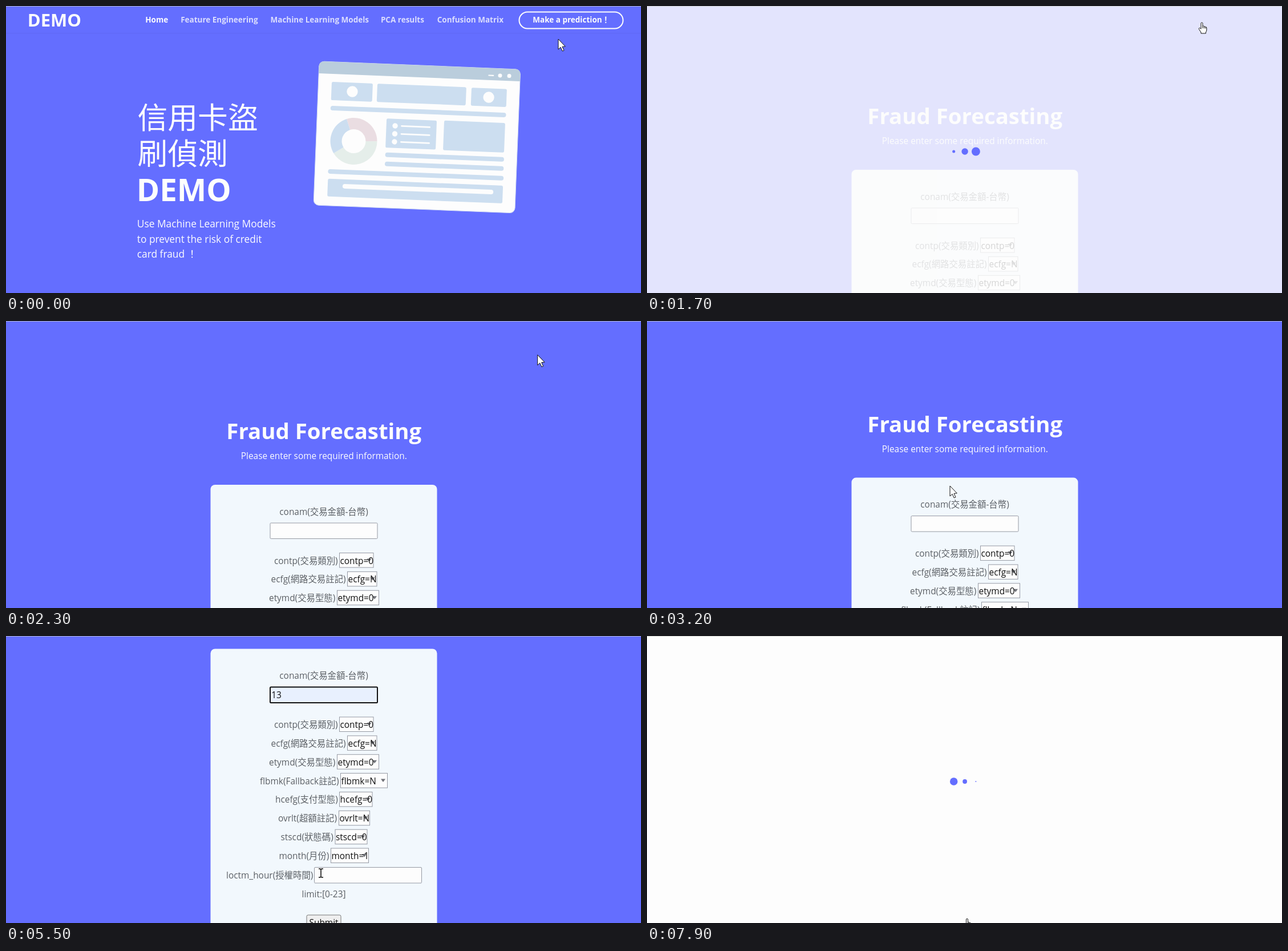
These frames come from a looping animation (1113x503 px, 8000 ms). An HTML page:

```html
<!DOCTYPE html>
<html lang="zh-Hant">
<head>
<meta charset="utf-8">
<title>Fraud detection demo</title>
<style>
html, body { margin: 0; width: 100%; height: 100%; overflow: hidden; background: #646eff; }
svg { display: block; width: 1113px; height: 503px; }
text { font-family: "Open Sans", "Noto Sans CJK TC", "Noto Sans CJK", sans-serif; white-space: pre; }
.b { font-weight: 700; }
.w { fill: #fdfdfd; }
.nav { font-size: 13.5px; font-weight: 700; fill: #fdfdfd; }
.big { font-size: 54.6px; font-weight: 700; }
.cjk { font-family: "Noto Sans CJK TC", "Noto Sans CJK", sans-serif; font-size: 52.8px; font-weight: 500; }
.lead { font-size: 17.35px; }
.form { font-size: 15.4px; }
.label { fill: #5c6065; font-weight: 400; }
.thin { font-family: "Noto Sans CJK TC", "Noto Sans CJK", sans-serif; font-weight: 300; }
.dark { fill: #111; }
.mid { text-anchor: middle; }
.box { fill: #fdfdfd; stroke: #9599a3; stroke-width: 1; }
.status { font: 12px "Liberation Serif", serif; fill: #5f6368; }
.cursor { stroke: #111; stroke-width: 1; stroke-linejoin: round; fill: #fff; }
</style>
</head>
<body>
<svg id="stage" viewBox="0 0 1113 503"></svg>
<script>
const LOOP = 8000, STEP = 100;
const stage = document.getElementById('stage');

const text = (x, y, cls, s, extra = '') => `<text x="${x}" y="${y}" class="${cls}" ${extra}>${s}</text>`;
const rect = (x, y, w, h, r, fill) => `<rect x="${x}" y="${y}" width="${w}" height="${h}" rx="${r}" fill="${fill}"/>`;
const dot = (x, y, r, fill) => `<circle cx="${x}" cy="${y}" r="${r}" fill="${fill}"/>`;

// Home page
const BLUE = '#ccdef0', PAPER = '#fdfdfd';

function slice(cx, cy, from, to, color) {
  const p = (r, a) => `${cx + r * Math.cos(a * Math.PI / 180)} ${cy + r * Math.sin(a * Math.PI / 180)}`;
  const large = to - from > 180 ? 1 : 0;
  return `<path fill="${color}" d="M${p(41, from)}A41 41 0 ${large} 1 ${p(41, to)}L${p(21, to)}A21 21 0 ${large} 0 ${p(21, from)}Z"/>`;
}

function windowArt() {
  const bars = [[23, 77, 308], [122, 155, 208.5], [122, 171, 208.5], [23, 188, 308]];
  const blocks = [[23.4, 35, 72, 32], [103.5, 35, 156, 32], [268.6, 35.5, 62, 31.5],
    [122, 95.5, 88, 51], [223, 95, 107, 52], [23.5, 205, 307, 31]];
  return `<g transform="translate(549 97) rotate(2.27)">
    <rect width="353" height="252" rx="9" fill="${PAPER}" stroke="#d3dcf3"/>
    <path fill="#bacddc" d="M0 21V9Q0 0 9 0H344Q353 0 353 9V21Z"/>
    ${rect(297, 11.6, 10, 2.2, 1, PAPER)}${dot(317.7, 12.4, 3.5, PAPER)}${dot(333.8, 12.4, 3.5, PAPER)}
    ${blocks.map(([x, y, w, h]) => rect(x, y, w, h, 2.5, BLUE)).join('')}
    ${bars.map(([x, y, w]) => rect(x, y, w, 8, 4, BLUE)).join('')}
    ${dot(60, 50.7, 9.7, PAPER)}${dot(299.3, 51.2, 9.7, PAPER)}
    ${slice(66, 137.5, -110, -2, '#eadde2')}${slice(66, 137.5, -2, 147, '#e5eeea')}${slice(66, 137.5, 147, 250, BLUE)}
    ${[107.6, 121.6, 135.6].map(y => dot(137.4, y, 4.7, PAPER) + rect(147.5, y - 1.4, 52, 2.8, 1.4, PAPER)).join('')}
    ${rect(49.5, 213, 264.5, 8, 4, PAPER)}
  </g>`;
}

const links = [[245, 'Home'], [307, 'Feature Engineering'], [464.3, 'Machine Learning Models'],
  [657.7, 'PCA results'], [756.5, 'Confusion Matrix']];

const home = `<g id="home">
  ${rect(0, 0, 1113, 503, 0, '#646eff')}${rect(0, 47, 1113, 1.5, 0, 'rgba(80,80,210,.15)')}
  ${text(37.8, 36, 'b w', 'DEMO', 'font-size="31"')}
  ${links.map(([x, s], i) => text(x - .8, 29, 'nav', s, i ? 'opacity=".78"' : '')).join('')}
  <rect id="cta" x="899.5" y="10.5" width="182" height="29" rx="14.5" fill="#fdfdfd" fill-opacity="0" stroke="#fdfdfd" stroke-width="2"/>
  ${text(923.3, 29, 'nav', 'Make a prediction！', 'id="ctaText"')}
  ${text(230.5, 215, 'cjk w', '信用卡盜')}${text(230.5, 278, 'cjk w', '刷偵測')}
  ${text(228.8, 342, 'big w', 'DEMO')}
  ${['Use Machine Learning Models', 'to prevent the risk of credit', 'card fraud！']
    .map((s, i) => text(229.8, 388 + i * 26.5, 'lead w', i == 2 ? 'card fraud ！' : s)).join('')}
  ${windowArt()}
</g>`;

// Form page, laid out unscrolled
const rows = [
  ['contp', '交易類別', 'contp=0', 470, 584.5, 59.5],
  ['ecfg', '網路交易註記', 'ecfg=N', 464.5, 598.5, 51.5],
  ['etymd', '交易型態', 'etymd=0', 461, 580.5, 73],
  ['flbmk', 'Fallback註記', 'flbmk=N', 445, 586.5, 82],
  ['hcefg', '支付型態', 'hcefg=0', 472, 584.5, 57.5],
  ['ovrlt', '超額註記', 'ovrlt=N', 477, 583.5, 54],
  ['stscd', '狀態碼', 'stscd=0', 481.5, 577, 56],
  ['month', '月份', 'month=1', 478.5, 569.5, 66]
];
const label = (name, note) =>
  `${name}(${note.replace(/[\u4e00-\u9fff]+/g, s => `<tspan class="thin">${s}</tspan>`)})`;

function selectRow([name, note, value, x, sx, w], i) {
  const y = 406.5 + i * 32.86, ax = sx + w - 7.5;
  return text(x, y + 19, 'form label', label(name, note)) +
    `<rect class="box" x="${sx}" y="${y}" width="${w}" height="25.5"/>` +
    `<path fill="#707278" d="M${ax - 4} ${y + 10}h8l-4 5.5z"/>` +
    text(sx + 1, y + 19, 'form dark', value);
}
const input = (id, x, y) =>
  `<rect id="${id}" class="box" x="${x}" y="${y}" width="188" height="27.5" rx="1.5"/>` +
  text(x + 2.3, y + 19.5, 'form dark', '', `id="${id}Text"`);

const form = `<g id="form">${rect(0, 0, 1113, 503, 0, '#646eff')}
  <g id="scroll">
    ${text(557.3, 207, 'b w mid', 'Fraud Forecasting', 'font-size="38.4"')}
    ${text(557.3, 242, 'form w mid', 'Please enter some required information.')}
    ${rect(358.5, 287, 397, 620, 8, '#f2f8fd')}
    ${text(557, 339.5, 'form label mid', label('conam', '交易金額-台幣'))}
    ${input('amount', 463, 354)}
    ${rows.map(selectRow).join('')}
    ${text(386, 689.5, 'form label', label('loctm_hour', '授權時間'))}
    ${input('hour', 540.5, 670)}
    ${text(557, 722, 'form label mid', 'limit:[0-23]')}
    <rect id="submit" x="527" y="753.5" width="60" height="28" rx="2.5" fill="#efefef" stroke="#767676"/>
    ${text(557, 772.5, 'form dark mid', 'Submit')}
  </g></g>`;

const dots = [537.7, 557.1, 576.4];
const loader = `<g id="loader">${rect(0, 0, 1113, 503, 0, PAPER)}
  ${dots.map((x, i) => `<circle id="dot${i}" cx="${x}" cy="255" fill="#646eff"/>`).join('')}</g>`;

const status = `<g id="status"><path fill="#dee1e6" d="M0 489H172Q176 489 176 493V503H0Z"/>
  ${text(4, 504, 'status', '127.0.0.1:5000/predict_page.html')}</g>`;

const cursors = `
  <path id="arrow" class="cursor" d="M0 0V18L4.2 14.3 7.2 21 10 19.8 7 13.3 12.3 12.9Z"/>
  <path id="hand" class="cursor" d="M-1.5 11V1.4Q-1.5 0 0 0T1.5 1.4V6.3Q3.2 5.2 4.1 7Q5.8 6.1 6.6 7.9Q8.4 7.5 8.4 9.5V13Q8.4 15 7 16.8V19H-1.5V17L-5 11.7Q-5.8 9.8-4.2 9.3Q-2.8 9.4-1.5 11.5M1.5 6.3V10M4.1 7V10.3M6.6 7.9V10.6"/>
  <path id="beam" fill="none" stroke="#111" stroke-width="1.6" d="M-4-7.5H-1.5L0-6.5 1.5-7.5H4M-4 7.5H-1.5L0 6.5 1.5 7.5H4M0-6.5V6.5"/>`;

stage.innerHTML = home + form + loader + status + rect(0, 0, 1113, 1, 0, 'rgba(205,208,200,.7)') + cursors;

const el = {};
stage.querySelectorAll('[id]').forEach(n => el[n.id] = n);
const set = (id, attrs) => { for (const k in attrs) el[id].setAttribute(k, attrs[k]); };
const show = (id, on) => { el[id].style.display = on ? '' : 'none'; };
const clamp = v => Math.max(0, Math.min(1, v));
const swing = v => .5 - .5 * Math.cos(Math.PI * clamp(v));

// Linear lookup in a table of [time, ...values]
function track(table, t) {
  let i = 0;
  while (i < table.length - 2 && t >= table[i + 1][0]) i++;
  const [a, b] = [table[i], table[i + 1]], p = clamp((t - a[0]) / (b[0] - a[0]));
  return a.slice(1).map((v, k) => v + (b[k + 1] - v) * p);
}

const scrollPath = [[3100, 0], [3200, 12.4], [3300, 76], [3400, 165], [3500, 237], [3600, 264.5]];
const mousePath = [[0, 968, 58], [100, 968, 57], [400, 972.5, 29], [2200, 972.5, 29], [2500, 850, 120],
  [2800, 600, 260], [3000, 531, 289], [3700, 531, 289], [4000, 522, 106], [4800, 522, 106],
  [5100, 538, 270], [5400, 552, 415.5], [6300, 552, 415.5], [6800, 560, 478], [7000, 562, 490.5],
  [7600, 562, 490.5], [7900, 561, 495.5]];
const mouseKinds = [[0, 'arrow'], [300, 'hand'], [2300, 'arrow'], [3900, 'beam'], [6900, 'hand']];

function field(id, value, focused, filled) {
  el[id + 'Text'].textContent = value;
  el[id].style.fill = filled ? '#e8f0fe' : PAPER;
  el[id].style.stroke = focused ? '#111' : '#9599a3';
  el[id].style.strokeWidth = focused ? 2 : 1;
}

function draw(t) {
  const loadAt = t < 7700 ? 1186 : 7787;
  const loading = t >= 1186 && t < 2030 || t >= 7787;
  show('home', t < 1186);
  show('form', t >= 1186);
  show('loader', loading);

  const hover = clamp((t - 300) / 200);
  set('cta', { 'fill-opacity': hover });
  el.ctaText.style.fill = hover > .5 ? '#646eff' : PAPER;
  const hint = t < 1000 ? clamp((t - 400) / 200) : 1 - clamp((t - 1050) / 300);
  set('status', { opacity: hint });

  if (loading) {
    const clock = (t - loadAt) * 1.128;
    dots.forEach((_, i) => {
      const p = ((clock + 320 - 160 * i) % 1400) / 560;
      set('dot' + i, { r: p < 2 ? 7.5 * swing(p < 1 ? p : 2 - p) : 0 });
    });
    set('loader', { opacity: t < 7700 ? 1 - swing((t - 1580) / 444) : 1 });
  }

  set('scroll', { transform: `translate(0 ${-track(scrollPath, t)[0]})` });
  field('amount', t < 4300 ? '' : t < 4500 ? '1' : '13', t >= 4100 && t < 5600, t >= 4500);
  field('hour', t < 6200 ? '' : '1', t >= 5600, t >= 6200);
  set('submit', { fill: t >= 6900 ? '#e5e5e5' : '#efefef' });

  const kind = mouseKinds.filter(k => k[0] <= t).pop()[1];
  const [x, y] = track(mousePath, t);
  for (const k of ['arrow', 'hand', 'beam']) show(k, k === kind);
  set(kind, { transform: `translate(${x} ${y})` });
}

const start = performance.now();
function frame() {
  const t = (performance.now() - start) % LOOP;
  draw(Math.floor(t / STEP) * STEP);
  requestAnimationFrame(frame);
}
frame();
</script>
</body>
</html>
```
